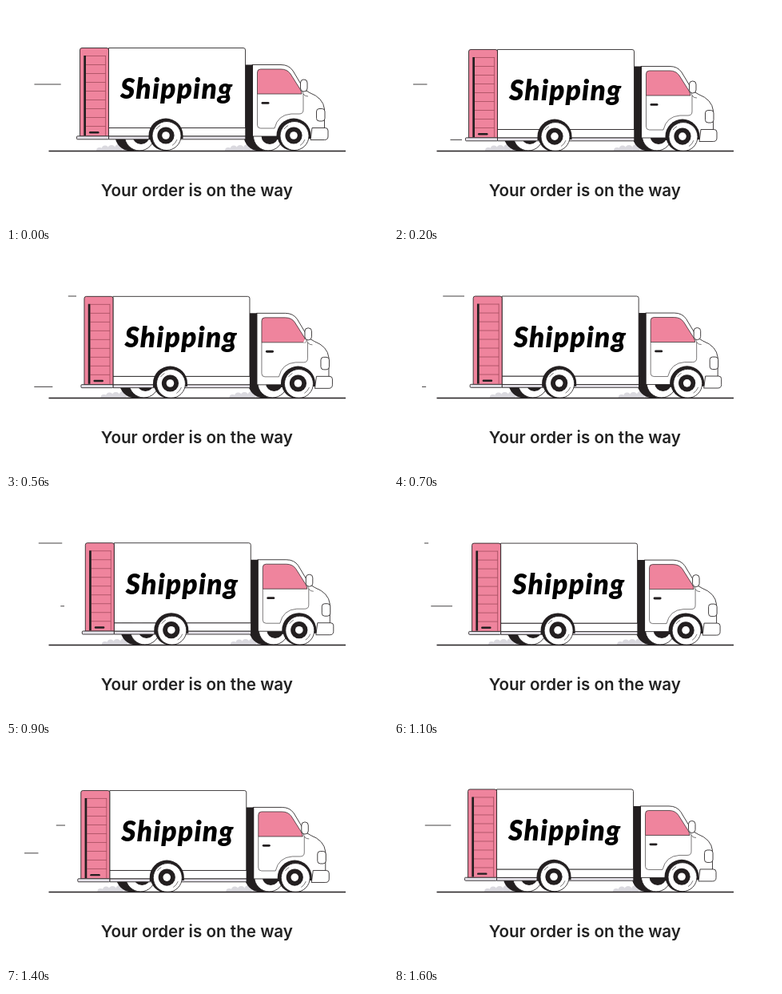
These frames come from a looping animation (478x274 px, 1630 ms). An HTML page:

```html
<!DOCTYPE html>
<html lang="en">
<head>
<meta charset="utf-8">
<title>Shipping</title>
<style>
  html, body { margin: 0; width: 100%; height: 100%; overflow: hidden; background: #fff; }
  svg { display: block; width: 478px; height: 274px; }
  .ink { fill: #231f20; stroke: none; }
  .pink { fill: #ef849d; }
  .shade { fill: #e6e3ea; }
  .puff { fill: #dad9df; stroke: none; }
  .thin { fill: none; stroke-width: .6; }
  text { fill: #222; stroke: none; }
</style>
</head>
<body>
<svg viewBox="0 0 478 274" fill="#fff" stroke="#231f20" stroke-width=".85">
  <defs>
    <g id="smoke" class="puff">
      <circle cx="-43" cy="181" r="4"/><circle cx="-36" cy="179" r="4.5"/>
      <circle cx="-28" cy="179" r="5"/><circle cx="-19" cy="178" r="5"/>
      <circle cx="-9" cy="179" r="5"/>
    </g>
    <g id="farWheel">
      <circle class="ink" cx="-44" cy="162" r="19.5"/>
      <circle cx="-33" cy="162.5" r="18.5"/>
      <circle class="ink" cx="-31" cy="162.5" r="10.5"/>
    </g>
    <g id="wheel">
      <path class="ink" d="M-21.5 5V0A21.5 21.5 0 0 1 21.5 0V4Z"/>
      <circle class="ink" cx="-1.5" r="19"/>
      <circle cx="1" cy=".5" r="18"/>
      <circle class="ink" r="10.6"/>
      <circle r="4.8" stroke="none"/>
      <path class="thin" d="M-12-8A14.5 14.5 0 0 1-7-12.5M14 5A14.5 14.5 0 0 1 8 12.5"/>
    </g>
    <clipPath id="windowClip"><use href="#window"/></clipPath>
    <clipPath id="aboveGround"><path d="M0 0H478V181.5H0Z"/></clipPath>
  </defs>

  <g id="streaks"></g>

  <g clip-path="url(#aboveGround)">
    <g id="truck">
      <use href="#smoke" x="160"/><use href="#smoke" x="321"/>
      <use href="#farWheel" x="200"/><use href="#farWheel" x="361"/>
      <g id="body">
        <path d="M128.5 152.5H300V163H128.5Z"/>
        <path class="shade" d="M128.5 163H300V166.8H128.5Z"/>
        <path d="M128.5 52.5H297Q299.5 52.5 299.5 55V152.5H128.5Z"/>
        <path class="pink" d="M92.5 163V55Q92.5 52.5 95 52.5H126Q128.5 52.5 128.5 55V163Z"/>
        <path id="slats" class="thin" stroke="#8c3a48"/>
        <path class="ink" d="M97.3 62H100V162H97.3Z"/>
        <rect class="ink" x="104" y="157" width="12.5" height="2.4" rx="1.2"/>
        <rect class="shade" x="88.5" y="162.8" width="40" height="4" rx="1"/>

        <path d="M308 73.5H344Q354 73.5 359 81L371 101Q374 106 380 108.5Q397 115 398.5 129V163H308Z"/>
        <path class="ink" d="M299.5 73.5H309V167H299.5Z"/>
        <path class="thin" d="M314.5 110V149Q314.5 153 318.5 153H336Q340 136 357 135H367Q372 135 372 130V110"/>
        <path id="window" class="pink" stroke-width=".7"
          d="M314.5 110V83Q314.5 79 318.5 79H344Q352 79 356 85L368 104Q370 107 370 110Z"/>
        <g clip-path="url(#windowClip)" stroke="none">
          <path id="shine" d="M0 111L17 78H28L11 111ZM14.5 111L31.5 78H35L18 111Z"/>
        </g>
        <rect class="ink" x="319.5" y="120" width="10" height="2.8" rx="1.4"/>
        <path class="thin" d="M371 105Q371 113 378 113"/>
        <rect x="368.5" y="92" width="8.5" height="15" rx="4"/>
        <rect x="388.5" y="128.5" width="10.5" height="15.5" rx="3.5"/>
        <path d="M383 152.5H399.5Q403 152.5 403 156V163Q403 167.5 398.5 167.5H381Z"/>
        <text x="143" y="116.3" font-family="Lato, sans-serif" font-size="35" font-weight="900"
          font-style="italic" letter-spacing="1.25" style="fill:#000">Shipping</text>
      </g>
      <g id="wheels"><use href="#wheel" x="200"/><use href="#wheel" x="360"/></g>
    </g>
  </g>

  <path d="M53.5 181.5H425" stroke-width="1.7"/>
  <text x="238.9" y="238" text-anchor="middle" font-family="Inter, sans-serif"
    font-size="20.6" font-weight="600">Your order is on the way</text>
</svg>
<script>
const LOOP = 1630, TAU = 2 * Math.PI;
const $ = id => document.getElementById(id);
const move = (id, x, y) => $(id).setAttribute("transform", `translate(${x} ${y})`);
const ease = (t, start, length) => {
  const u = Math.min(1, Math.max(0, (t - start) / length));
  return u * u * (3 - 2 * u);
};

let slats = "M124.5 62V162";
for (let i = 0; i < 9; i++) slats += `M100 ${62.5 + i * 11}H124.5`;
$("slats").setAttribute("d", slats);

// Each streak is drawn leftwards over 50px: start x, y, delay.
const streaks = [[85, 167.4, 0], [88, 54, 400], [73, 132.8, 800], [74, 98, 1230]].map(([x, y, delay]) => {
  const path = document.createElementNS("http://www.w3.org/2000/svg", "path");
  $("streaks").append(path);
  return { x, y, delay, path };
});

function draw(now) {
  const t = now % LOOP;
  const bounce = 2 * Math.abs(Math.sin(2 * TAU * t / LOOP));
  move("truck", 3.5 * (1 - Math.cos(TAU * t / LOOP)), 0);
  move("body", 0, bounce);
  move("wheels", 0, 162 + bounce * .55);
  move("shine", 266.5 + (t - 250) * .32, 0);

  for (const { x, y, delay, path } of streaks) {
    const local = (t - delay + 13 + LOOP) % LOOP - 13;
    const head = x - 50 * ease(local, -13, 600);
    const tail = x - 50 * ease(local, 300, 500);
    path.setAttribute("d", tail - head > .1 ? `M${head} ${y}H${tail}` : "");
  }
  requestAnimationFrame(draw);
}
requestAnimationFrame(draw);
</script>
</body>
</html>
```
